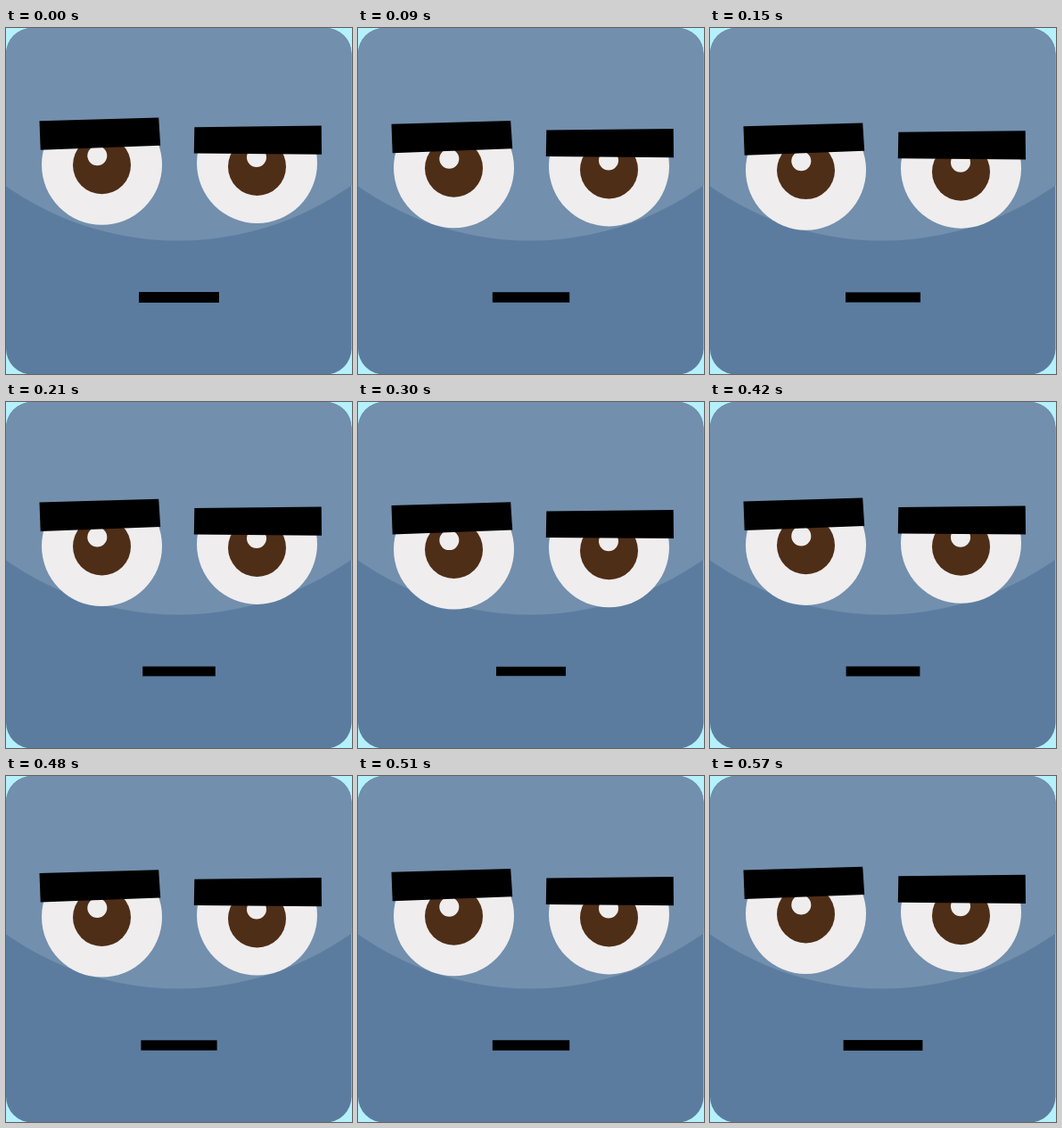
Animation, 388 px wide and 388 px high, one loop 0.6 s. Source, as an HTML page:

```html
<!DOCTYPE html>
<html lang="en">
<head>
<meta charset="utf-8">
<title>Bored face</title>
<style>
  html, body { margin: 0; width: 100%; height: 100%; overflow: hidden; background: #b4f1fc; }
  svg { display: block; width: 100vw; height: 100vh; }
</style>
</head>
<body>
<svg viewBox="0 0 388 388">
  <defs>
    <clipPath id="face"><rect width="387.5" height="388.5" rx="29"/></clipPath>
    <clipPath id="underLeft"><path d="M30 120L180 116V240H30Z"/></clipPath>
    <clipPath id="underRight"><path d="M205 126H360V240H205Z"/></clipPath>
  </defs>
  <g clip-path="url(#face)">
    <rect width="388" height="389" fill="#5b7c9f"/>
    <circle cx="193" cy="-97.5" r="336" fill="#728fad"/>
  </g>
  <g id="left">
    <g clip-path="url(#underLeft)">
      <circle cx="107.5" cy="153.3" r="67.5" fill="#efedee"/>
      <circle cx="107.5" cy="153.7" r="32.5" fill="#4f2e17"/>
      <circle cx="102.3" cy="143.3" r="11" fill="#efedee"/>
    </g>
    <path d="M37.5 104.3L171.2 100.5L173.2 131.8L38.7 136.8Z"/>
  </g>
  <g id="right">
    <g clip-path="url(#underRight)">
      <circle cx="281.5" cy="151.5" r="67.5" fill="#efedee"/>
      <circle cx="281.5" cy="155.5" r="32.5" fill="#4f2e17"/>
      <circle cx="281" cy="145" r="11" fill="#efedee"/>
    </g>
    <path d="M211.3 111.2L353.7 109.6L354 141.8L210.8 140.6Z"/>
  </g>
  <rect id="mouth" x="-45" y="-6" width="90" height="12"/>
</svg>
<script>
  const LOOP = 600, STEP = 30;
  const [left, right, mouth] = ["left", "right", "mouth"].map(id => document.getElementById(id));
  const move = (part, transform) => part.setAttribute("transform", transform);

  function draw(ms) {
    const time = Math.floor((ms % LOOP) / STEP) * STEP;
    const droop = 1 - Math.abs(1 - time / (LOOP / 2));
    move(left, `translate(0 ${11.8 * droop})`);
    move(right, `translate(0 ${11.3 * droop})`);
    move(mouth, `translate(194 302) scale(${1 - 0.133 * droop})`);
  }

  const start = performance.now();
  function tick() {
    draw(performance.now() - start);
    requestAnimationFrame(tick);
  }
  tick();
</script>
</body>
</html>
```
